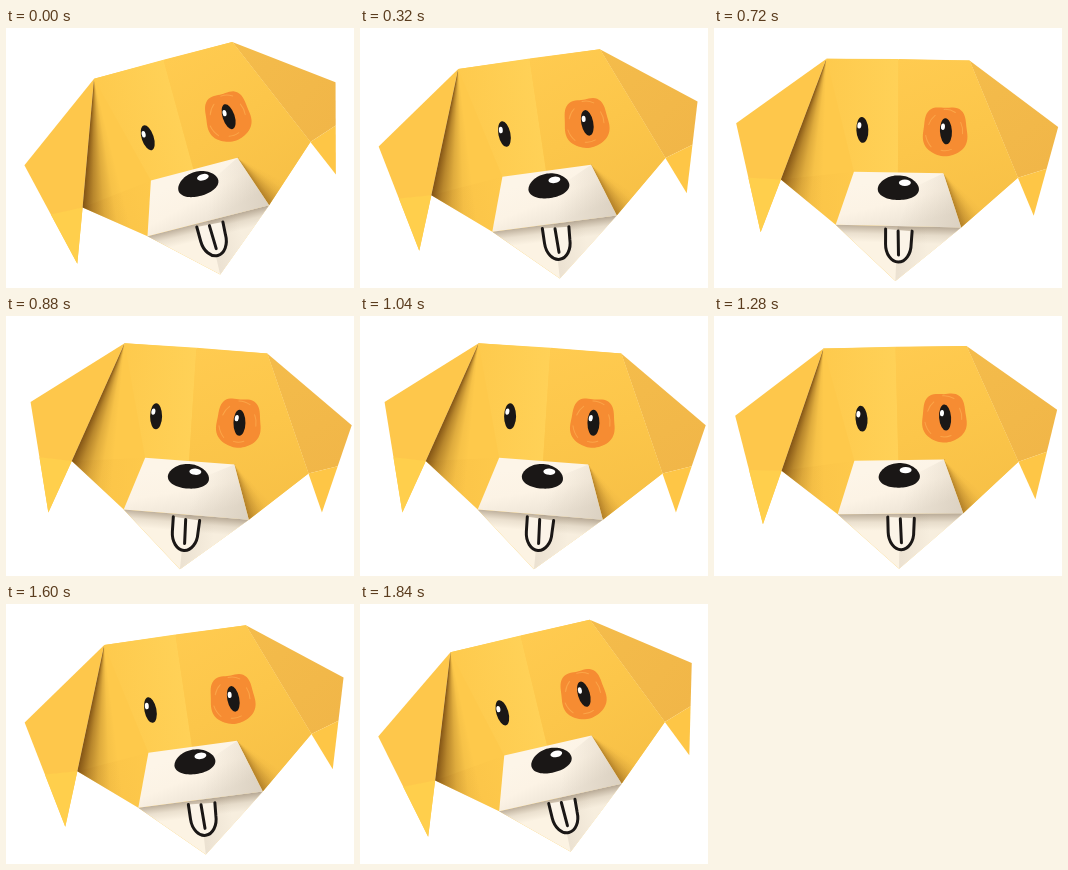
Write an HTML page with a canvas that moves like this. It is 348x260 px and loops after 1.92 s.

```html
<!DOCTYPE html>
<html lang="en">
<head>
<meta charset="utf-8">
<title>Paper dog</title>
<style>
html, body { margin: 0; width: 100%; height: 100%; overflow: hidden; background: #fff; }
canvas { display: block; }
</style>
</head>
<body>
<canvas id="stage" width="348" height="260"></canvas>
<script>
const ctx = document.getElementById('stage').getContext('2d');
const LOOP = 1920, STEP = 80, RAD = Math.PI / 180;
const MIN_TILT = -15.3, MAX_TILT = 5.5;
const INK = '#1a1716';

// Key corners of the folded paper, with the head upright
const crownL = [112, 31], crownR = [255, 32], crown = [184, 31];
const earL = [22, 96], tipL = [47, 205], cheekL = [67, 152];
const earR = [344, 98], tipR = [320, 187], cheekR = [304, 149];
const browL = [140, 144], browR = [229.5, 145];
const jawL = [122, 197], jawR = [247.5, 199], chin = [182, 253];

const mix = (a, b, k) => a.map((v, i) => v + (b[i] - v) * k);

function poly(fill, ...pts) {
  ctx.beginPath();
  pts.forEach(p => ctx.lineTo(...p));
  ctx.closePath();
  ctx.fillStyle = fill;
  ctx.fill();
}

function fade(from, to, ...colors) {
  const g = ctx.createLinearGradient(...from, ...to);
  colors.forEach((c, i) => g.addColorStop(i / (colors.length - 1), c));
  return g;
}

// Shadow that fans out from the fold a-b and dies away over `spread` degrees
function fan(a, b, spread, alpha) {
  const edge = Math.atan2(b[1] - a[1], b[0] - a[0]) / RAD;
  const g = ctx.createConicGradient(0, ...a);
  for (let k = 0; k <= 1; k += 0.25) {
    g.addColorStop((edge - spread * (1 - k)) / 360, `rgba(95,50,5,${alpha * k * k})`);
  }
  return g;
}

function oval(x, y, rx, ry, fill, tilt = 0) {
  ctx.beginPath();
  ctx.ellipse(x, y, rx, ry, tilt * RAD, 0, 2 * Math.PI);
  ctx.fillStyle = fill;
  ctx.fill();
}

// Closed outline whose radius is scaled by shape(angle)
function blob(x, y, rx, ry, fill, shape) {
  const pts = [];
  for (let a = 0; a < 360; a += 5) {
    const r = shape(a * RAD);
    pts.push([x + rx * r * Math.cos(a * RAD), y + ry * r * Math.sin(a * RAD)]);
  }
  poly(fill, ...pts);
}

function drawEars() {
  const low = mix(earL, tipL, 0.5);
  poly('#fec74b', crownL, earL, tipL, cheekL);
  poly('#ffcf4c', low, tipL, cheekL);
  const bend = mix(earR, tipR, 0.47);
  poly(fade(crownR, bend, '#f4bc4b', '#f1b648'), crownR, earR, bend, cheekR);
  poly('#fec646', bend, tipR, cheekR);
}

function drawHead() {
  poly('#fec94b', crownL, crownR, cheekR, jawR, chin, jawL, cheekL);
  poly(fade(crownL, crown, '#feca4d', '#ffd157'), crownL, crown, [184, 150], browL);
  poly(fade(crown, jawR, '#ffcb50', '#fcc64a', '#f7c046'), crown, crownR, cheekR, jawR, [184, 150]);
  poly(fade(browL, cheekL, 'rgba(238,178,60,0)', 'rgba(238,178,60,.3)'), browL, jawL, cheekL);
  poly(fan(crownL, cheekL, 19, 0.78), crownL, cheekL, jawL, browL);
  poly(fan(browR, jawR, 30, 0.45), browR, jawR, mix(jawR, cheekR, 0.7));
}

function drawPatch() {
  const x = 231, y = 103;
  blob(x, y, 23, 25.5, '#f68c32', a => 1 + 0.03 * Math.sin(5 * a) - 0.05 * Math.cos(4 * a));
  ctx.strokeStyle = '#fba548';
  ctx.lineWidth = 1;
  for (let i = 0; i < 5; i++) {
    const a = 1.2 + i * 1.15, r = 0.76 + 0.1 * (i % 2);
    ctx.beginPath();
    ctx.ellipse(x, y, 23 * r, 25.5 * r, 0, a, a + 0.6);
    ctx.stroke();
  }
}

function drawEye(x, y) {
  oval(x, y, 6, 13, INK, -3);
  oval(x - 3, y - 4.5, 2, 3.2, '#fff', 5);
}

function drawJaw() {
  poly('#fcf3e3', jawL, jawR, chin);
  poly(fade([184, 225], [214, 225], '#ece2d2', '#f7eede'), [184, 198], jawR, chin);
  poly(fade([184, 198], [183.6, 215], 'rgba(92,70,45,.4)', 'rgba(110,88,60,.12)', 'rgba(110,88,60,0)'), jawL, jawR, chin);
  ctx.beginPath();
  ctx.moveTo(172, 201);
  ctx.lineTo(172, 216);
  ctx.ellipse(184.8, 216, 12.8, 18, 0, Math.PI, 0, true);
  ctx.lineTo(198.5, 203);
  ctx.fillStyle = '#fbf4e8';
  ctx.fill();
  ctx.moveTo(184.5, 203);
  ctx.lineTo(185, 227);
  ctx.strokeStyle = INK;
  ctx.lineWidth = 3;
  ctx.stroke();
}

function drawMuzzle() {
  poly(fade([172, 150], [184, 199], '#fdf5e8', '#fcf3e5', '#eee5d7'), browL, browR, jawR, jawL);
  poly(fade([190, 180], jawR, 'rgba(190,178,160,0)', 'rgba(190,178,160,.4)'), browR, jawR, jawL);
  blob(184.5, 160, 20.5, 12.3, INK, a => 1 + 0.03 * Math.sin(3 * a));
  oval(191, 154.6, 6, 3.2, '#fff');
}

function draw(time) {
  const t = Math.floor(time % LOOP / STEP) * STEP;
  const swing = 1 - Math.abs(1 - t / (LOOP / 2));
  ctx.setTransform(1, 0, 0, 1, 0, 0);
  ctx.fillStyle = '#fff';
  ctx.fillRect(0, 0, 348, 260);
  ctx.translate(174, 130);
  ctx.rotate((MIN_TILT + (MAX_TILT - MIN_TILT) * swing) * RAD);
  ctx.translate(-174, -130);
  ctx.lineCap = ctx.lineJoin = 'round';
  drawEars();
  drawHead();
  drawPatch();
  drawEye(148.2, 102);
  drawEye(231.8, 103);
  drawJaw();
  drawMuzzle();
}

const start = performance.now();
function tick() {
  draw(performance.now() - start);
  requestAnimationFrame(tick);
}
tick();
</script>
</body>
</html>
```
